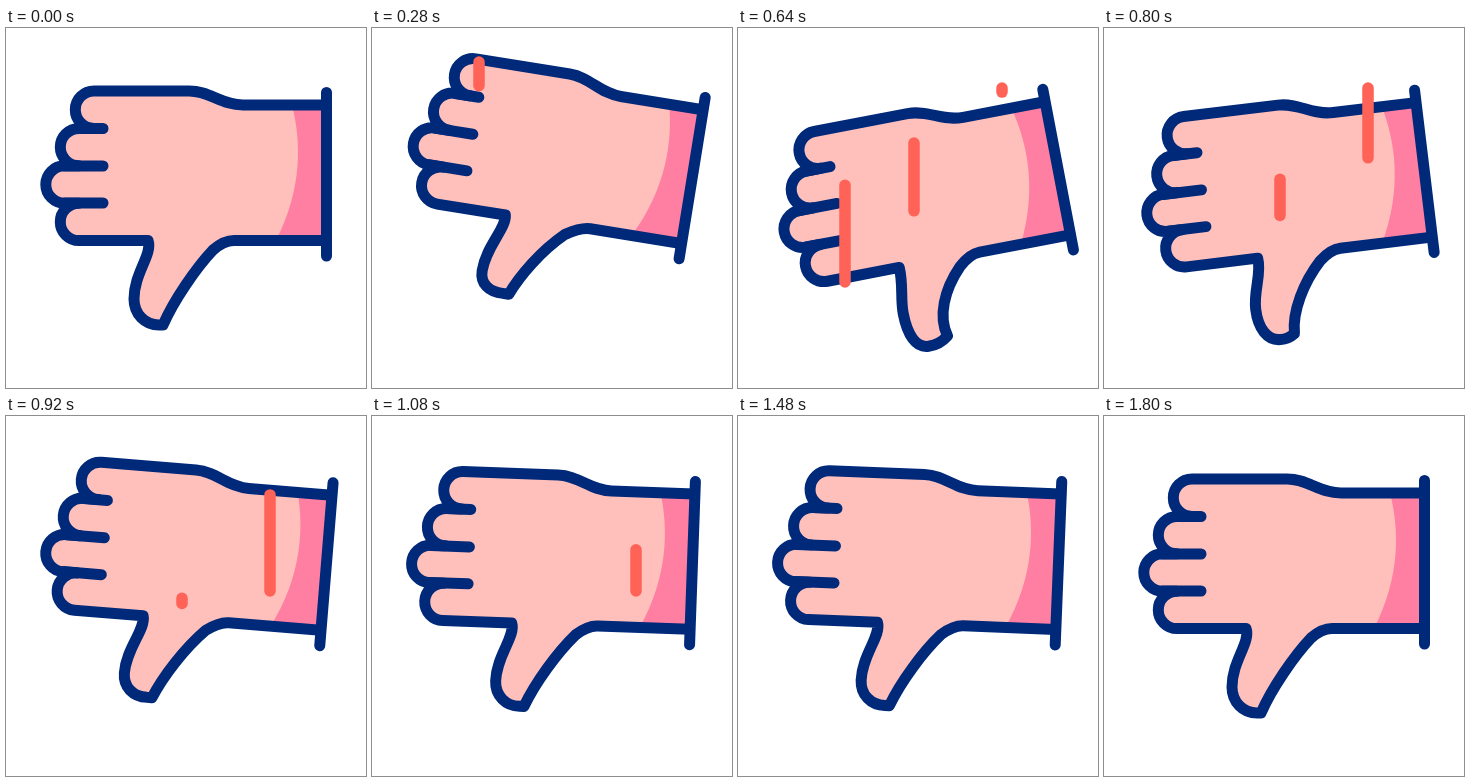
Animation of 360 by 360 pixels, one loop 2 s. Source, as an HTML page:

```html
<!DOCTYPE html>
<html lang="en">
<head>
<meta charset="utf-8">
<title>Thumbs down</title>
<style>
  html, body { margin: 0; width: 100%; height: 100%; overflow: hidden; background: #fff; }
  svg { display: block; width: 100vw; height: 100vh; }
  .ink { fill: none; stroke: #00297a; stroke-width: 11; stroke-linecap: round; stroke-linejoin: round; }
  .streak { stroke-width: 11.5; stroke-linecap: round; }
</style>
</head>
<body>
<svg viewBox="0 0 360 360">
  <g id="hand">
    <path id="skin" fill="#ffc0bb"/>
    <path fill="#ff7fa3" d="M286 77C295 112 297 160 270 212.5H320V77z"/>
    <path id="outline" class="ink"/>
    <path class="ink" d="M73 100.5H97M58.5 138H97M58.5 175H97M320.5 64.5V228"/>
  </g>
  <g id="streaks"></g>
</svg>
<script>
const LOOP = 2000, STEP = 40;
const PIVOT = [296, 146];
const RED = '#ff6257', PINK = '#ff7fa3';

// Damped swing: [time, degrees], eased between keys
const swing = [[80, 0], [400, 13.3], [695, -13], [970, 6.2], [1250, -6.2], [1530, 3], [1800, 0]];

// Thumb outline from its base, round the tip, to the palm, in three poses
const thumb = {
  rest:  [142,212.5, 147,226, 128,245, 128,271, 128,286, 139,297, 153,297, 155,297, 157,297, 168,272, 190,240, 207,222],
  left:  [142,212.5, 145,226, 128,246, 128,271, 128,284, 138,291, 152,290, 155,290, 158,290, 166,270, 182,243, 204,222],
  right: [146,212.5, 147,230, 141,243, 141,259, 141,280, 147,295, 160,295.5, 171,296, 180,289, 175,268, 186,243, 206,223]
};

const streaks = [
  { x: 107, from: 34, to: 254, head: [250, 530], tail: [483, 763] },
  { x: 176, from: 115, to: 187.5, head: [378, 658], tail: [660, 940] },
  { x: 264, from: 60, to: 175, head: [630, 910], tail: [865, 1200] }
];

const $ = id => document.getElementById(id);
const mix = (a, b, p) => a + (b - a) * p;
const progress = (t, [a, b]) => Math.min(1, Math.max(0, (t - a) / (b - a)));
const ease = p => (1 - Math.cos(Math.PI * p)) / 2;

for (const s of streaks) {
  s.el = document.createElementNS('http://www.w3.org/2000/svg', 'path');
  s.el.setAttribute('class', 'streak');
  $('streaks').append(s.el);
}

function angleAt(t) {
  const i = swing.findIndex(key => t < key[0]);
  if (i < 1) return 0;
  const [t0, a0] = swing[i - 1], [t1, a1] = swing[i];
  return mix(a0, a1, ease(progress(t, [t0, t1])));
}

function handPath(angle) {
  const pose = angle > 0 ? thumb.left : thumb.right;
  const bend = Math.abs(angle) / (angle > 0 ? 9.5 : 10.5);
  const p = thumb.rest.map((v, i) => mix(v, pose[i], bend).toFixed(2));
  const knuckle = 'a18.7 18.7 0 0 0 0 37.4';
  return `M320 77H237C215 77 204 63 183 63H88${knuckle}H73${knuckle}H58.5${knuckle}H73${knuckle}` +
    `L${p.slice(0, 2)}C${p.slice(2, 8)}C${p.slice(8, 14)}Q${p.slice(14, 18)}C${p.slice(18, 24)}` +
    'C215 215 221 212.5 228 212.5H320';
}

function draw(t) {
  const angle = angleAt(t);
  $('hand').setAttribute('transform', `rotate(${angle} ${PIVOT})`);
  const d = handPath(angle);
  $('skin').setAttribute('d', d + 'z');
  $('outline').setAttribute('d', d);

  for (const s of streaks) {
    const top = mix(s.from, s.to, progress(t, s.tail));
    const bottom = mix(s.from, s.to, progress(t, s.head));
    const visible = t >= s.head[0] && t <= s.tail[1];
    s.el.setAttribute('d', visible ? `M${s.x} ${top}V${bottom + 0.01}` : '');
    s.el.setAttribute('stroke', top === s.to ? PINK : RED);
  }
}

function tick() {
  draw(Math.floor(performance.now() % LOOP / STEP) * STEP);
  requestAnimationFrame(tick);
}
tick();
</script>
</body>
</html>
```
